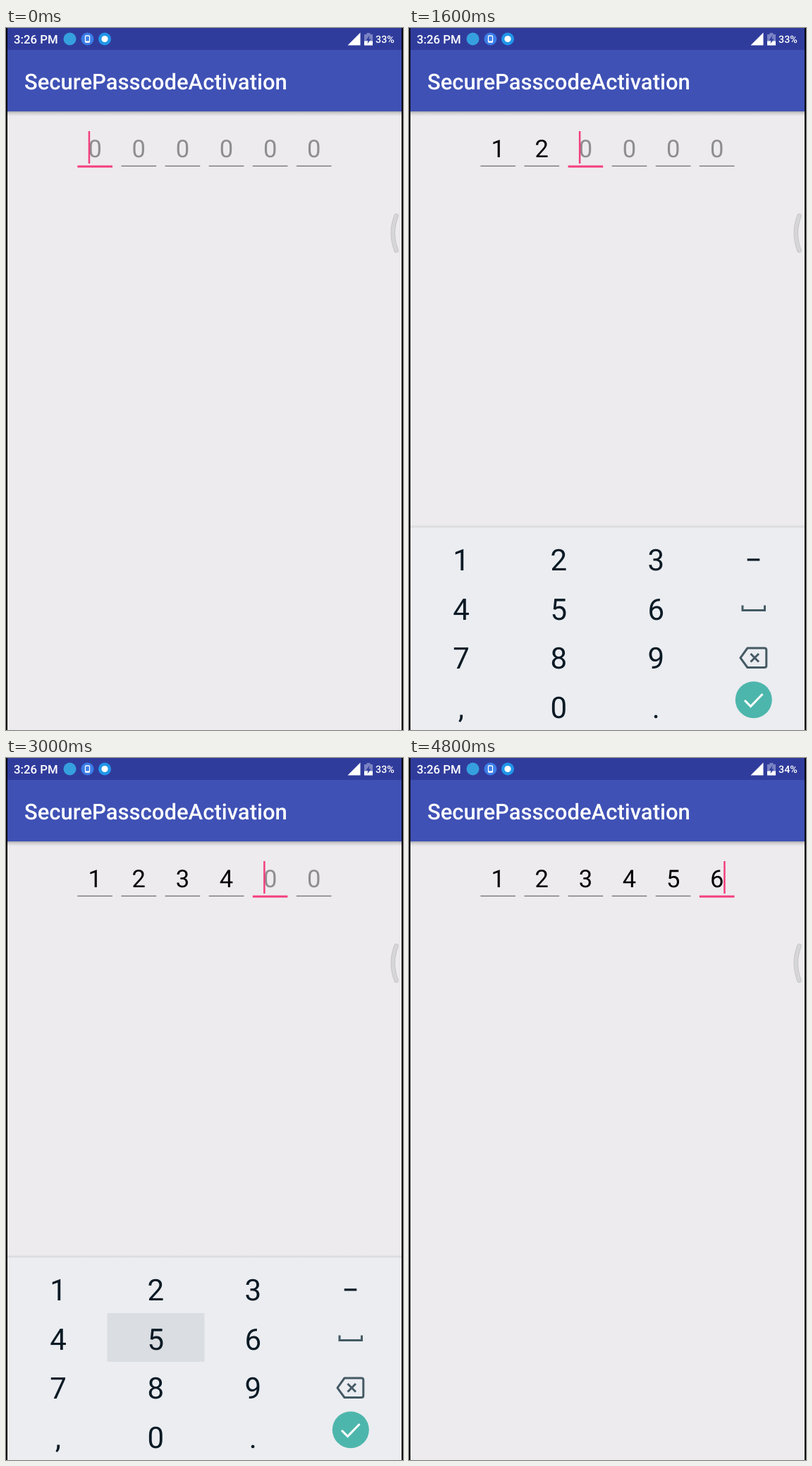
These frames come from a looping animation (563x994 px, 5100 ms). An HTML page:

```html
<!DOCTYPE html>
<html lang="en">
<head>
<meta charset="utf-8">
<title>Passcode entry</title>
<style>
  html, body { margin: 0; width: 100%; height: 100%; overflow: hidden; background: #000; }
  svg { display: block; width: 563px; height: 994px; font-family: Roboto, sans-serif; }
  .bar { font-weight: 500; fill: #fff; }
  .mid { text-anchor: middle; }
  text { text-rendering: geometricPrecision; }
  #keys { font-size: 42px; fill: #0a1a25; }
  #fields { font-size: 34.5px; }
  .icon { fill: none; stroke: #455a64; stroke-width: 3; }
</style>
</head>
<body>
<svg viewBox="0 0 563 994">
  <defs>
    <linearGradient id="drop" x2="0" y2="1">
      <stop stop-color="#a9a8ac"/>
      <stop offset=".4" stop-color="#d3d1d4"/>
      <stop offset="1" stop-color="#edebee"/>
    </linearGradient>
    <linearGradient id="rise" x2="0" y2="1">
      <stop stop-color="#d5d6d9" stop-opacity="0"/>
      <stop offset="1" stop-color="#d5d6d9"/>
    </linearGradient>
    <clipPath id="screen"><path d="M2 0H561V994H2z"/></clipPath>
  </defs>
  <g clip-path="url(#screen)">
    <path fill="#edebee" d="M0 0H563V994H0z"/>
    <path fill="url(#drop)" d="M0 118H563V125H0z"/>
    <path fill="#3f51b5" d="M0 31H563V118H0z"/>
    <path fill="#303c9c" d="M0 0H563V31H0z"/>

    <g class="bar">
      <text x="11" y="21.5" font-size="16.8">3:26 PM</text>
      <text x="26" y="86.5" font-size="31">SecurePasscodeActivation</text>
      <text id="charge" x="524" y="21" font-size="14.3"></text>
    </g>
    <circle cx="90.5" cy="15.5" r="9" fill="#36a0de"/>
    <circle cx="115.5" cy="15.5" r="9" fill="#3b7de8"/>
    <rect x="112.5" y="11" width="6" height="9" rx="1" fill="none" stroke="#fff" stroke-width="1.3"/>
    <path stroke="#fff" stroke-width="2" d="M112.5 19.5h6"/>
    <circle cx="140" cy="15.5" r="9" fill="#2196ea"/>
    <circle cx="140" cy="15.5" r="4.6" fill="#fff"/>
    <path fill="#fff" d="M484.5 24.5H502.5V6.5z"/>
    <path fill="#7a83c4" d="M508 9h3.5V7h5v2H520V24.5H508z"/>
    <path fill="#fff" d="M508 18.5H520V24.5H508z"/>
    <path fill="#303c9c" d="M515.5 10.5L510.5 17.5H513.5L512.5 22.5L517.5 15.5H514.5z"/>

    <g fill="none" stroke-linecap="round">
      <path stroke="#c3c2c5" stroke-width="6.5" d="M553.5 266Q544 290.5 553.5 315"/>
      <path stroke="#d6d5d8" stroke-width="4.8" d="M553.5 266Q544 290.5 553.5 315"/>
    </g>

    <g id="fields" class="mid"></g>
    <rect id="cursor" y="146" width="2.5" height="46" fill="#f43e7e"/>

    <g id="keyboard">
      <path fill="url(#rise)" d="M0 703H563V707.5H0z"/>
      <path fill="#ebedf1" d="M0 707.5H563V994H0z"/>
      <rect id="press" width="138" height="69" fill="#dadde1"/>
      <g id="keys" class="mid"></g>
      <path stroke="#0a1a25" stroke-width="3.2" d="M479.7 752.9h17.6"/>
      <path class="icon" d="M473 817.5v7h31.5v-7"/>
      <path class="icon" stroke-linejoin="round" d="M480 878H504Q506.8 878 506.8 880.800V903Q506.800 905.500 504 905.500H480L470 891.800z"/>
      <path class="icon" d="M484.5 886l11.5 11.5m0-11.5l-11.5 11.5"/>
      <circle cx="488.8" cy="951.2" r="26" fill="#4db6ac"/>
      <path fill="none" stroke="#fff" stroke-width="3" d="M476 952l8.5 8.5L501.5 943"/>
    </g>
  </g>
</svg>
<script>
const LOOP = 5100, BLINK = 500;
const typedAt = [1100, 1600, 2200, 2700, 3100, 3800];
const pressedAt = { 1500: 2, 2100: 3, 2600: 4, 3000: 5 };
const $ = id => document.getElementById(id);
const clamp = v => Math.max(0, Math.min(1, v));
const fieldX = i => 126.2 + 62.1 * i;

function set(el, attrs) {
  for (const name in attrs) el.setAttribute(name, attrs[name]);
}
function add(parent, tag, attrs, text = '') {
  const el = document.createElementNS(parent.namespaceURI, tag);
  set(el, attrs);
  el.textContent = text;
  return parent.appendChild(el);
}

[...'123456789,0.'].forEach((key, i) => add($('keys'), 'text',
  { x: 74 + 138.2 * (i % 3), y: 768.3 + 69.5 * Math.floor(i / 3) }, key));

const fields = typedAt.map((_, i) => ({
  digit: add($('fields'), 'text', { x: fieldX(i), y: 182.5 }),
  line: add($('fields'), 'rect', { x: fieldX(i) - 24.8, width: 49.6 })
}));

function draw(time) {
  const t = Math.floor(time % LOOP / 100) * 100;
  const typed = typedAt.filter(at => at <= t).length;
  const focus = Math.min(typed, 5);

  fields.forEach(({ digit, line }, i) => {
    digit.textContent = i < typed ? i + 1 : 0;
    set(digit, { fill: i < typed ? '#000' : '#8e8d90' });
    set(line, i === focus
      ? { y: 194.6, height: 3, fill: '#f43e7e' }
      : { y: 194.8, height: 1.3, fill: '#706f72' });
  });

  // The cursor restarts its blink whenever a digit is typed.
  const since = t - (typed ? typedAt[typed - 1] : -300);
  set($('cursor'), {
    x: fieldX(focus) + (typed > 5 ? 9.5 : -9.5),
    opacity: Math.floor(since / BLINK) % 2 ? 0 : 1
  });

  const key = pressedAt[t] - 1;
  set($('press'), key >= 0
    ? { x: 5.3 + 138.2 * (key % 3), y: 717 + 69 * Math.floor(key / 3), opacity: 1 }
    : { opacity: 0 });

  const enter = 1 - (1 - clamp((t - 50) / 300)) ** 3;
  const leave = clamp((t - 4450) / 300) ** 2;
  const shown = enter * (1 - leave);
  set($('keyboard'), { opacity: shown, transform: `translate(0 ${29 * (1 - shown)})` });

  $('charge').textContent = t < 4100 ? '33%' : '34%';
}

const start = performance.now();
function tick() {
  draw(performance.now() - start);
  requestAnimationFrame(tick);
}
tick();
</script>
</body>
</html>
```
